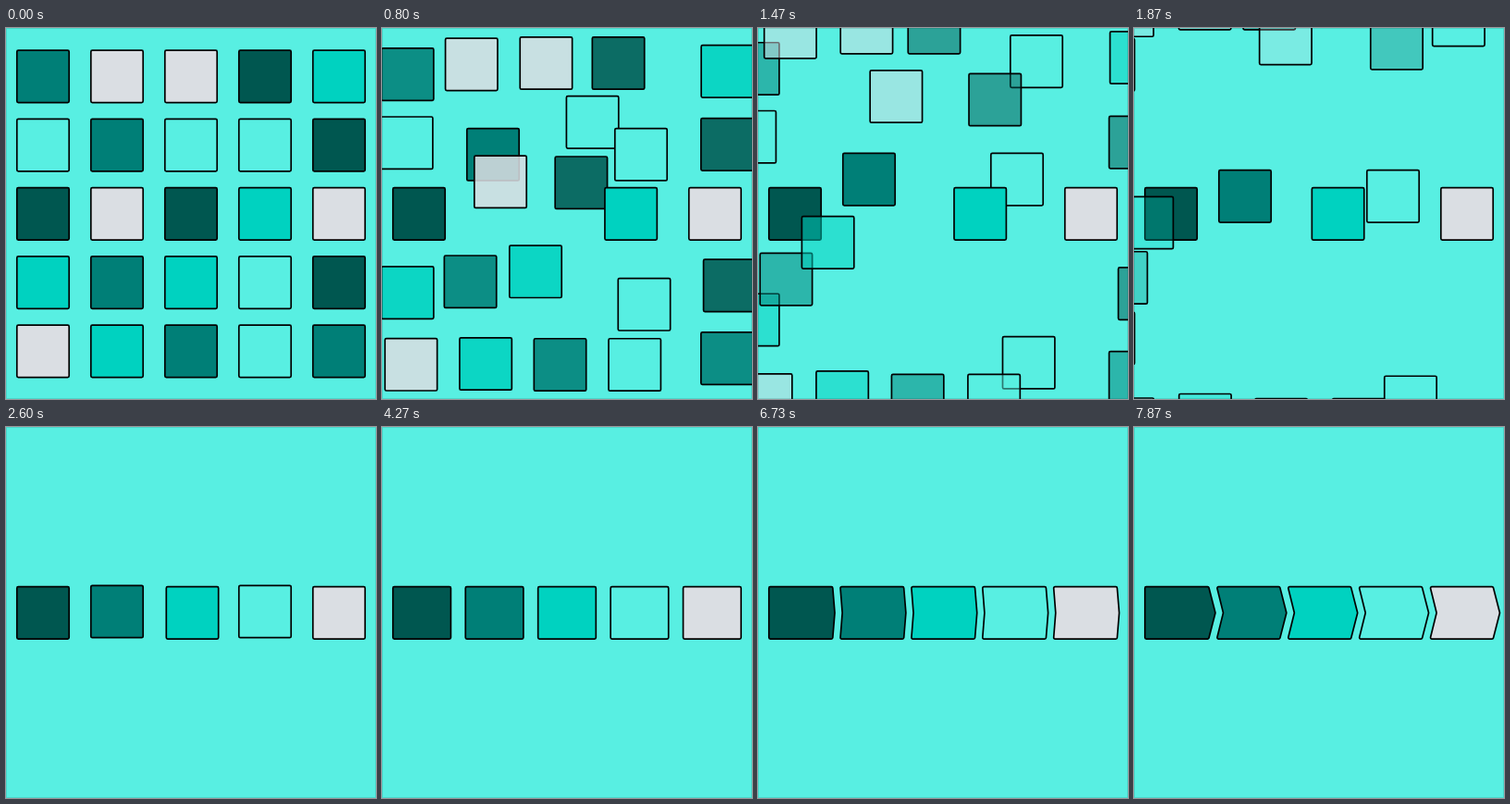
These frames come from a looping animation (400 px wide and 401 px high, 8 s). An HTML page with a canvas:

```html
<!DOCTYPE html>
<html lang="en">
<head>
<meta charset="utf-8">
<title>Squares to arrows</title>
<style>
  html, body { margin: 0; height: 100%; overflow: hidden; background: #58efe2; }
  canvas { display: block; }
</style>
</head>
<body>
<canvas width="400" height="401"></canvas>
<script>
const ctx = document.querySelector('canvas').getContext('2d');
const LOOP = 8000, START = 70, STAGE = 2800, FPS = 15;
const BG = '#58efe2';
const COLORS = { d: '#005750', t: '#007f77', m: '#00d2c0', o: BG, g: '#dadee3' };
const GRID = 'tggdm otood dgdmg mtmod gmtot'.split(' ');
const PITCH_X = 80, PITCH_Y = 74.25, MID_Y = 200.9, HALF = 28.2;
const LEFT = 11.8, RIGHT = 388.2, WIDE = 68.9;

// Travel of each square, row by row; the keepers gather in the middle row.
const TRAVEL = [
  [[-91, -17], [-171, -96], [-166, -106], [-180, -106], [98, -41]],
  [[-98, -18], [0, PITCH_Y], [203, -182], [0, PITCH_Y], [96, -6]],
  [[0, 0], [59, -255], [113, -248], [-PITCH_X, 0], [0, 0]],
  [[-91, 81], [-180, -7], [-250, -87], [25.5, 174], [116, 24]],
  [[-63, 106], [-58, 100], [-55, 107], [-50, 107], [96, 57]]
];
const KEEPERS = new Set(['0,2', '1,1', '3,2', '3,1', '4,2']);

const mix = (a, b, k) => a + (b - a) * k;

function ease(x) {
  x = Math.min(1, Math.max(0, x));
  return x < 0.5 ? 2 * x * x : 1 - 2 * (1 - x) ** 2;
}

function polygon(points, color, alpha = 1) {
  const last = points[points.length - 1], [x0, y0] = points[0];
  ctx.beginPath();
  ctx.moveTo((last[0] + x0) / 2, (last[1] + y0) / 2);
  points.forEach((p, i) => {
    const next = points[(i + 1) % points.length];
    ctx.arcTo(...p, ...next, 1.5);
  });
  ctx.closePath();
  ctx.globalAlpha = alpha;
  ctx.fillStyle = color;
  ctx.fill();
  ctx.globalAlpha = 1;
  ctx.stroke();
}

function drawScatter(k) {
  GRID.forEach((row, r) => [...row].forEach((key, c) => {
    const [dx, dy] = TRAVEL[r][c];
    const x = 40 + c * PITCH_X + dx * k;
    const y = MID_Y + (r - 2) * PITCH_Y + dy * k;
    const l = x - HALF, t = y - HALF, b = y + HALF, e = x + HALF;
    const alpha = KEEPERS.has(c + ',' + r) ? 1 : 1 - k;
    polygon([[l, t], [e, t], [e, b], [l, b]], COLORS[key], alpha);
  }));
}

function drawRow(widen, point) {
  const w = mix(2 * HALF, WIDE, widen);
  const pitch = (RIGHT - LEFT - w) / 4;
  const top = MID_Y - HALF, bottom = MID_Y + HALF;
  [...'dtmog'].forEach((key, i) => {
    const x = LEFT + i * pitch, right = x + w;
    const left = x + (i ? 0.9 * point : 0);
    const shape = [[left, top], [right, top], [right + 8 * point, MID_Y], [right, bottom], [left, bottom]];
    if (i) shape.push([x + 8.6 * point, MID_Y]);
    polygon(shape, COLORS[key]);
  });
}

function draw(now) {
  // The motion advances in steps of one fifteenth of a second.
  const time = Math.floor((now % LOOP + 5) * FPS / 1000) * 1000 / FPS;
  const stage = n => ease((time - START) / STAGE - n);
  ctx.fillStyle = BG;
  ctx.fillRect(0, 0, 400, 401);
  ctx.strokeStyle = '#000';
  ctx.lineWidth = 1.7;
  ctx.lineJoin = 'round';
  if (stage(0) < 1) drawScatter(stage(0));
  else drawRow(stage(1), stage(2));
  ctx.strokeStyle = 'rgba(0, 60, 55, 0.15)';
  ctx.lineWidth = 1;
  ctx.strokeRect(0.5, 0.5, 399, 400);
}

let origin;
function tick(now) {
  origin ??= now;
  draw(now - origin);
  requestAnimationFrame(tick);
}
requestAnimationFrame(tick);
</script>
</body>
</html>
```
